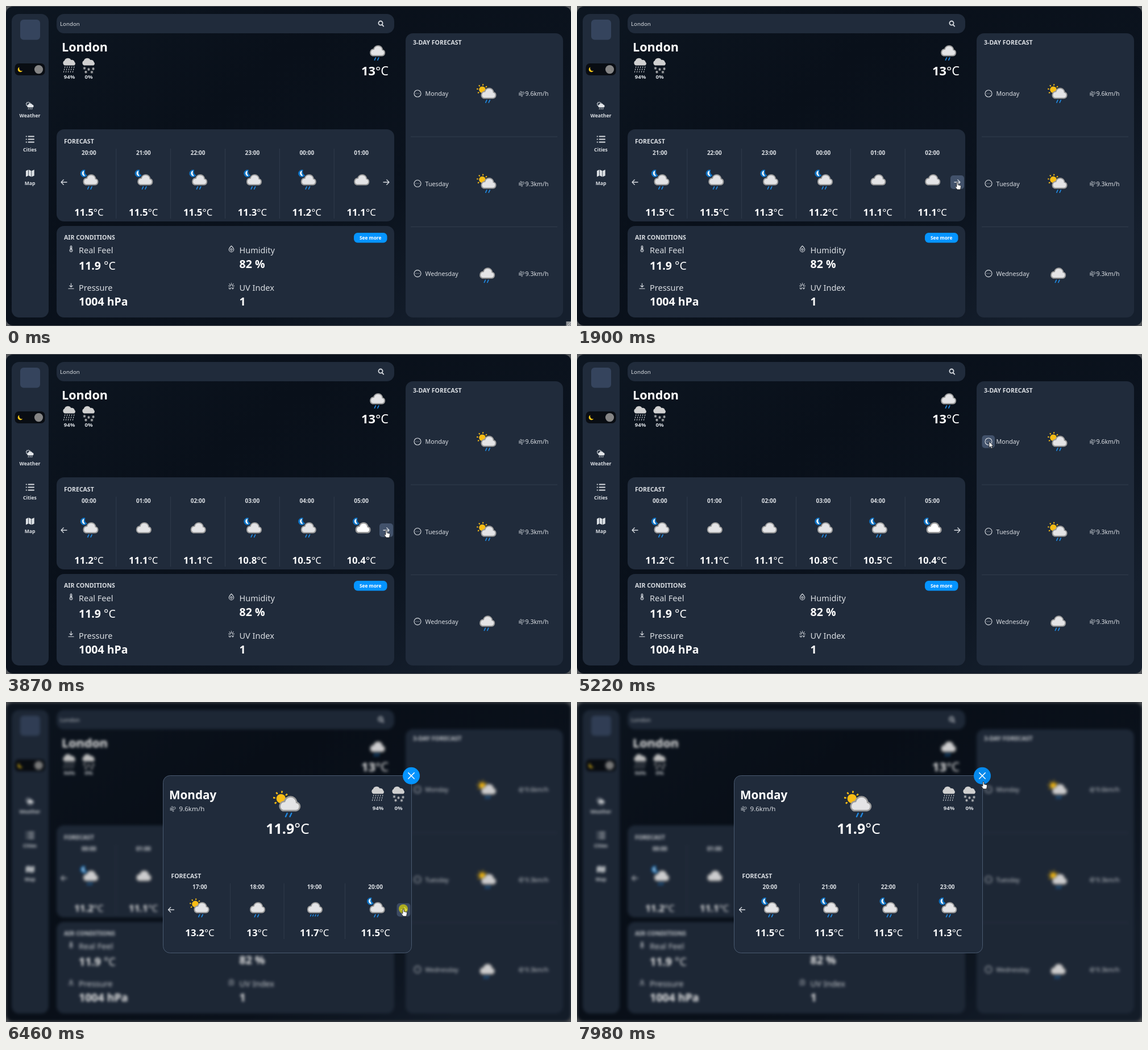
Recreate the animation shown at these times as an HTML page. Size 994x563 px, loop 8000 ms.

```html
<!DOCTYPE html>
<html lang="en">
<head>
<meta charset="utf-8">
<title>Weather dashboard</title>
<style>
html, body { margin: 0; width: 100%; height: 100%; overflow: hidden; background: #55585c; }
svg { display: block; width: 994px; height: 563px; font-family: "Noto Sans", "Open Sans", sans-serif; }
.b { font-weight: 700; }
.m { text-anchor: middle; }
.panel { fill: #202b3b; }
.line { stroke: #313c4c; stroke-width: 1; }
.ico { fill: none; stroke: #d9dde2; stroke-width: 1.1; stroke-linecap: round; stroke-linejoin: round; }
.hover { fill: #42526b; }
.blur { filter: blur(2.7px) brightness(.9); }
</style>
</head>
<body>
<svg id="stage" viewBox="0 0 994 563">
  <defs>
    <linearGradient id="bg" x1="0" y1="0" x2="1" y2=".7">
      <stop offset="0" stop-color="#0d1621"/>
      <stop offset=".4" stop-color="#09101a"/>
      <stop offset=".75" stop-color="#0b131e"/>
      <stop offset="1" stop-color="#151f2d"/>
    </linearGradient>
    <path id="cloud" d="M-8 9H8.5A5.3 5.3 0 0 0 9.2-1.4L9.2-2.2A7.8 7.8 0 0 0-6-2.6A6 6 0 0 0-8 9Z" stroke="#9b9b9b" stroke-width="2"/>
    <path id="drops" d="M-2.6 12.4l-2 4.2M2.8 12.4l-2 4.2" stroke="#2088e0" stroke-width="1.7" stroke-linecap="round"/>
    <path id="shower" d="M-6 12.6l-1.3 2.8M-1.8 12.6l-1.3 2.8M2.4 12.6l-1.3 2.8M6.6 12.6l-1.3 2.8" stroke="#2088e0" stroke-width="1.5" stroke-linecap="round"/>
    <g id="sun">
      <circle r="8.6" fill="none" stroke="#f9bd16" stroke-width="2.6" stroke-dasharray="1.9 4.854"/>
      <circle r="5.8" fill="#f9bd16"/>
    </g>
    <g id="moon">
      <path d="M2-5.8A6.1 6.1 0 1 0 5.4 3.6A7 7 0 0 1 2-5.8Z" fill="#0f73c4" stroke="#0f73c4" stroke-linejoin="round"/>
      <path d="M0-4.4A4.6 4.6 0 0 0 1.6 4.4A8 8 0 0 1 0-4.4Z" fill="#fff" stroke="#fff" stroke-width=".8"/>
    </g>
    <path id="wind" class="ico" d="M-4.6-1.3H-1.3a1.5 1.5 0 1 0-1.4-2M-4.6.5H2.8a1.9 1.9 0 1 0-1.8-2.4M-4.6 2.3H.4a1.2 1.2 0 1 1-1.1 1.6" style="stroke-width:.8"/>
    <path id="puff" d="M-8.4-2a4.6 4.6 0 0 1-.2-8.4A6.4 6.2 0 0 1 3-11.6 5 5 0 0 1 9.2-7.8a3.5 3.5 0 0 1-.6 5.8Z" fill="#d0d0d0"/>
    <g id="rainy">
      <use href="#puff"/>
      <path d="M-7.5-.2l-3 12M-3.5-.2l-3 12M.5-.2l-3 12M4.5-.2l-3 12M8.5-.2l-3 12" stroke="#c4c8cc" stroke-width="1.1" stroke-dasharray="2.6 1.6"/>
    </g>
    <path id="flake" d="M0-2.6V2.6M-2.3-1.3L2.3 1.3M-2.3 1.3L2.3-1.3" stroke="#d0d0d0" stroke-width=".9"/>
    <g id="snowy">
      <use href="#puff"/>
      <use href="#flake" x="-7.5" y="3"/><use href="#flake" y="5"/><use href="#flake" x="8" y="4"/>
      <use href="#flake" x="-5" y="9.6"/><use href="#flake" x="5.5" y="9.8"/>
    </g>
    <path id="next" class="ico" d="M-5 0H5M.8-4.2L5 0L.8 4.2" style="stroke-width:1.3"/>
    <path id="back" class="ico" d="M5 0H-5M-.8-4.2L-5 0L-.8 4.2" style="stroke-width:1.3"/>
  </defs>

  <g id="page">
    <rect x="-20" y="-20" width="1034" height="603" fill="#55585c"/>
    <rect y="1" width="994" height="561" rx="12" fill="url(#bg)"/>
    <g id="static"></g>
    <rect id="nextHover" class="hover" x="657" y="298" width="24" height="24" rx="5"/>
    <use href="#next" x="669" y="310"/>
    <rect id="dotsHover" class="hover" x="712.5" y="143" width="22.5" height="22.5" rx="5"/>
    <g id="days"></g>
    <g id="hours"></g>
  </g>

  <g id="modal">
    <rect x="276.5" y="129.5" width="437" height="312" rx="12" fill="#202b3b" stroke="#4a5a70"/>
    <g id="modalStatic"></g>
    <g id="modalHours"></g>
    <g id="modalNext">
      <rect id="modalHover" class="hover" x="687.5" y="354" width="24" height="23.5" rx="5"/>
      <use href="#next" x="700" y="365.5"/>
    </g>
    <circle id="close" cx="713" cy="129.8" r="15"/>
    <path d="M707.8 124.6l10.4 10.4M718.2 124.6l-10.4 10.4" stroke="#fff" stroke-width="1.5" stroke-linecap="round"/>
  </g>

  <g id="grip">
    <rect x="985.5" y="555" width="9" height="8" fill="#8f9296"/>
    <path d="M987 563l7-7M990.5 563l4-4" stroke="#d5d6d8"/>
  </g>
  <circle id="press" r="8" fill="#e2da00" fill-opacity=".68"/>
  <g id="pointer" stroke="#111" stroke-width=".8" stroke-linejoin="round" fill="#fff">
    <path id="arrow" d="M0 0V10.8L2.5 8.5L4.1 12.2L5.9 11.4L4.3 7.9H7.7Z"/>
    <path id="hand" d="M-1.1.8Q0-.6 1.1.8V4.6L5.4 5.6Q6.7 6 6.5 7.8L5.6 13H-.2L-3.5 8.4Q-3.2 6.8-1.1 8.2Z"/>
  </g>
</svg>
<script>
const $ = id => document.getElementById(id);
const show = (id, on) => { $(id).style.display = on ? "" : "none"; };
const clamp = v => Math.min(1, Math.max(0, v));

const text = (x, y, s, size, cls = "", fill = "#dadee3") =>
  `<text x="${x}" y="${y}" font-size="${size}" class="${cls}" fill="${fill}">${s}</text>`;
const degrees = (x, y, n, size) =>
  text(x, y, `<tspan class="b">${n}</tspan>°C`, size, "m", "#fff");
const panel = (x, y, w, h) =>
  `<rect class="panel" x="${x}" y="${y}" width="${w}" height="${h}" rx="13"/>`;
const use = (id, x, y) => `<use href="#${id}" x="${x}" y="${y}"/>`;
const icon = (x, y, d, extra = "") => `<path class="ico" transform="translate(${x} ${y})" d="${d}" ${extra}/>`;

// kind: sun, moon, fair (dry moon), rain, shower, cloud
function sky(kind, x, y, scale = 1) {
  const night = kind === "moon" || kind === "fair";
  const dx = night || kind === "sun" ? 2.4 : 0;
  const wet = { sun: "drops", moon: "drops", rain: "drops", shower: "shower" }[kind];
  const white = kind === "fair";
  return `<g transform="translate(${x} ${y}) scale(${scale})">` +
    (kind === "sun" ? use("sun", -8, -6) : night ? use("moon", -9, -11) : "") +
    `<g transform="translate(${dx} 0)"><use href="#cloud" fill="${white ? "#fff" : "#e4e4e6"}"/>` +
    (white ? `<use href="#cloud" fill="#fff" transform="scale(.95)" style="stroke:#fff"/>` : "") +
    (wet ? use(wet, 0, 0) : "") + "</g></g>";
}

const chances = (x1, x2, y, base) =>
  use("rainy", x1, y) + use("snowy", x2, y) +
  text(x1, base, "94%", 9.5, "b m") + text(x2, base, "0%", 9.5, "b m");

function buildStatic() {
  const nav = [["Weather", 196], ["Cities", 255.5], ["Map", 314.5]];
  const facts = [
    [128, 435, "Real Feel", 464, `<tspan class="b">11.9</tspan> °C`],
    [410.5, 435, "Humidity", 461, `<tspan class="b">82 %</tspan>`],
    [128, 501, "Pressure", 527, `<tspan class="b">1004 hPa</tspan>`],
    [410.5, 501, "UV Index", 527, `<tspan class="b">1</tspan>`]
  ];
  $("static").innerHTML =
    panel(10, 14, 65, 534) + panel(89, 14, 594, 34) + panel(89, 217, 594, 162) +
    panel(89, 387, 594, 161) + panel(703, 48, 277, 500) +
    `<rect x="25" y="24" width="35" height="35.5" rx="6" fill="#35445d"/>` +
    `<rect x="15.5" y="101" width="53" height="21" rx="7" fill="#090d13"/>` +
    `<circle cx="57.5" cy="111.6" r="7.6" fill="#858585"/>` +
    `<path d="M23.4 107.6a4.5 4.5 0 1 0 5.8 6.2a4.6 4.6 0 0 1-5.8-6.2Z" fill="#f7c81a"/>` +
    `<circle cx="39" cy="172.6" r="3.2" fill="none" stroke="#d9dde2" stroke-width="2" stroke-dasharray="1.4 1"/>` +
    `<path d="M39 178.5a2.6 2.6 0 0 1 0-5a4 3.8 0 0 1 7.2 0a2.6 2.6 0 0 1 .8 5Z" fill="#e2e5e9"/>` +
    icon(42, 175, "M-2 5l-.8 1.4M1 5l-.8 1.4M4 5l-.8 1.4") +
    icon(42, 234.5, "M-2.5-5H7M-2.5 0H7M-2.5 5H7M-6.3-5h.2M-6.3 0h.2M-6.3 5h.2", `style="stroke-width:2"`) +
    `<path d="M35 290l4.2-2v10.5l-4.2 2ZM40 288l4.4 2v10.5l-4.4-2ZM45.2 290l4.5-2v10.5l-4.5 2Z" fill="#dde1e5"/>` +
    nav.map(([s, y]) => text(42, y, s, 8.6, "b m")).join("") +
    text(95, 35, "London", 9.7) +
    icon(659, 30.5, "M3 3L5.2 5.2M3.6-.4A3.6 3.6 0 1 1-3.6-.4A3.6 3.6 0 1 1 3.6-.4", `style="stroke-width:1.8"`) +
    text(98, 80, "London", 21.6, "b", "#fff") +
    chances(111.5, 145.5, 106.5, 128) + sky("rain", 653, 78.5) + degrees(649, 122, 13, 21.8) +
    text(102, 242, "FORECAST", 10.5, "b") + text(102, 411, "AIR CONDITIONS", 10.6, "b") +
    use("back", 102, 310) +
    `<rect x="612" y="399" width="58.5" height="17.5" rx="6.5" fill="#0594ff"/>` +
    text(641.2, 411, "See more", 8.3, "b m", "#fff") +
    facts.map(([x, y, name, vy, value]) => text(x, y, name, 14.5) + text(x, vy, value, 19.5, "", "#fff")).join("") +
    icon(114.5, 427, "M-1.3 1V-3.6a1.3 1.3 0 0 1 2.6 0V1a2.4 2.4 0 1 1-2.6 0M0-2V3") +
    icon(396.5, 427, "M0-5C2-3 4.2-.6 4.2 1.4a4.2 4.2 0 0 1-8.4 0C-4.2-.6-2-3 0-5M1.6 1.4a1.6 1.6 0 1 1-3.2 0a1.6 1.6 0 1 1 3.2 0") +
    icon(114.5, 493, "M0-5V1.4M-2.6-1L0 1.5L2.6-1M-4.6 4.2H4.6") +
    icon(396.5, 492.5, "M-2.4 1a2.5 2.5 0 1 1 4.8 0M-5 0h1M4 0h1M0-5v1M-3.5-3.5l.6.6M3.5-3.5l-.6.6M-4 3v1.2q0 1.2 1.4 1.2T-1.2 4.2V3M1 3l1.4 2.4L4 3") +
    text(716, 67.5, "3-DAY FORECAST", 10.5, "b") +
    `<path class="line" d="M712 230H970M712 388.5H970"/>`;

  $("days").innerHTML = [["Monday", "sun", 9.6], ["Tuesday", "sun", 9.3], ["Wednesday", "rain", 9.3]]
    .map(([day, kind, wind], i) => {
      const y = 154 + i * 158.3;
      return icon(724, y, "M6 0A6 6 0 1 1-6 0A6 6 0 1 1 6 0M-2.8 0h.1M0 0h.1M2.8 0h.1") +
        text(737.5, y + 4.3, day, 10.7) + sky(kind, 846, y - .8) +
        use("wind", 907, y + .5) + text(913.5, y + 4.3, wind + "km/h", 10.6);
    }).join("");

  $("modalStatic").innerHTML =
    text(287, 171, "Monday", 20.7, "b", "#fff") + use("wind", 293.5, 188) +
    text(304.5, 192.2, "9.6km/h", 11.6) +
    sky("sun", 495, 178.5, 1.4) + degrees(495.5, 232, 11.9, 25) +
    chances(654.5, 690.5, 163.5, 189.5) +
    text(290.5, 310, "FORECAST", 10.5, "b") + use("back", 290.5, 365.5);
}

// Rows are baselines and edges. Spare width is shared evenly between the cells.
function strip(id, cells, hour, x, width, rows) {
  const need = ([temp]) => temp % 1 ? 51 : 38;
  const spare = (width - cells.reduce((sum, c) => sum + need(c), 0)) / cells.length;
  $(id).innerHTML = cells.map((cell, i) => {
    const w = need(cell) + spare, mid = x + w / 2;
    const h = String((hour + i) % 24).padStart(2, "0");
    x += w;
    return text(mid, rows.time, h + ":00", 10, "b m") + sky(cell[1], mid, rows.sky) +
      degrees(mid, rows.temp, cell[0], 16.8) +
      (i < cells.length - 1 ? `<path class="line" d="M${x} ${rows.top}V${rows.bottom}"/>` : "");
  }).join("");
}

const tonight = [[11.5, "moon"], [11.5, "moon"], [11.5, "moon"], [11.3, "moon"], [11.2, "moon"],
  [11.1, "cloud"], [11.1, "cloud"], [10.8, "moon"], [10.5, "moon"], [10.4, "fair"]];
const monday = [[13.2, "sun"], [13, "rain"], [11.7, "shower"], [11.5, "moon"],
  [11.5, "moon"], [11.5, "moon"], [11.3, "moon"]];
const pageRows = { time: 261.5, sky: 305.5, temp: 369, top: 251, bottom: 374 };
const modalRows = { time: 329.3, sky: 361.5, temp: 411.5, top: 319, bottom: 417 };

const pageClicks = [1770, 2570, 3300, 3730];
const modalClicks = [6460, 6810, 7080];
const presses = [...pageClicks, 5090, ...modalClicks];
const OPEN = 5290;

// start, duration, from, bend, to
const moves = [
  [530, 770, [954, 545], [800, 410], [669, 310]],
  [4130, 770, [669, 310], [742, 215], [725, 154]],
  [5760, 630, [725, 154], [716, 270], [699, 364]],
  [7210, 700, [699, 364], [711, 260], [715, 140]]
];

// The pointer advances in 70 ms steps.
function pointerAt(t) {
  const [t0, span, a, b, c] = moves.filter(m => t >= m[0]).pop() || moves[0];
  const held = Math.floor((t - t0) / 70) * 70;
  const p = clamp(held / span);
  const e = t0 === 530 ? 1 - (1 - p) ** 2 : (1 - Math.cos(Math.PI * p)) / 2;
  return [0, 1].map(i => a[i] * (1 - e) ** 2 + 2 * b[i] * e * (1 - e) + c[i] * e * e);
}

const inside = ([x, y], cx, cy, r) => Math.abs(x - cx) <= r && Math.abs(y - cy) <= r;
const fade = (t, on, off) => clamp((t - on) / 250) * (1 - clamp((t - off) / 250));
const clicked = (clicks, t) => clicks.filter(c => t >= c + 70).length;

const shown = {};
function setStrip(id, step, draw) {
  if (shown[id] === step) return;
  shown[id] = step;
  draw(step);
}

function render(t) {
  const open = t >= OPEN;
  const at = pointerAt(t);
  const step = clicked(modalClicks, t);
  setStrip("hours", clicked(pageClicks, t),
    n => strip("hours", tonight.slice(n, n + 6), 20 + n, 98, 575, pageRows));
  setStrip("modalHours", step,
    n => strip("modalHours", monday.slice(n, n + 4), 17 + n, 287.3, 416.5, modalRows));

  $("page").classList.toggle("blur", open);
  show("modal", open);
  show("modalNext", step < 3);
  show("grip", t < 70);
  $("nextHover").style.opacity = fade(t, 1200, 4250);
  $("dotsHover").style.opacity = fade(t, 4800, OPEN);
  $("modalHover").style.opacity = fade(t, 6250, 9000);

  const overNext = !open && inside(at, 669, 310, 12);
  const overModal = open && step < 3 && inside(at, 699.5, 365.5, 12);
  const overClose = open && inside(at, 713, 130, 14);
  const hand = overNext || overModal || overClose;
  $("close").setAttribute("fill", overClose ? "#0689ec" : "#0594ff");

  const move = `translate(${at[0]} ${at[1]})`;
  $("pointer").setAttribute("transform", move);
  $("press").setAttribute("transform", move);
  show("pointer", t >= 530);
  show("arrow", !hand);
  show("hand", hand);
  show("press", presses.some(c => t >= c && t < c + (c === 6460 ? 70 : 130)));
}

buildStatic();
const begin = performance.now();
function tick() {
  render((performance.now() - begin) % 8000);
  requestAnimationFrame(tick);
}
tick();
</script>
</body>
</html>
```
